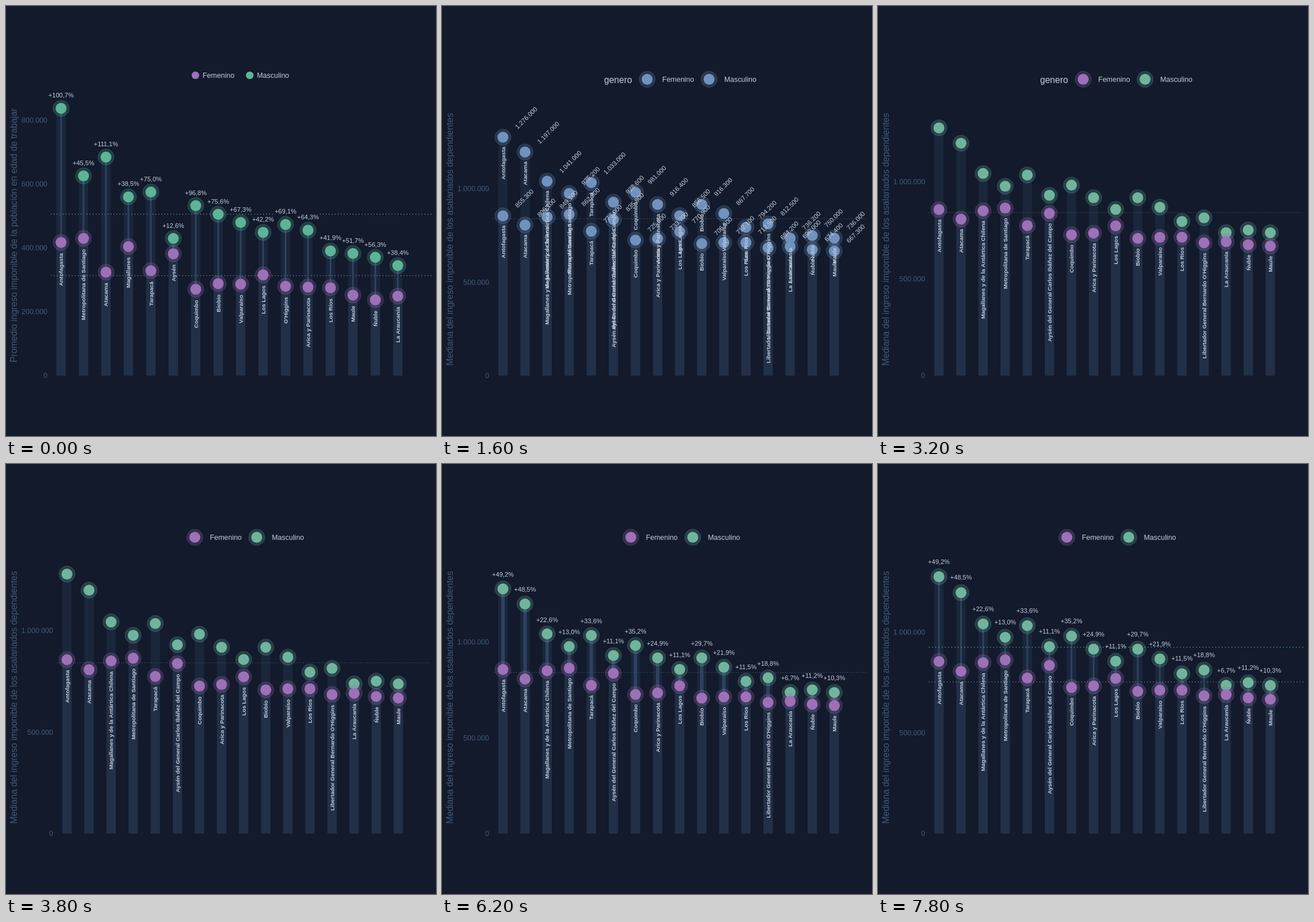
An HTML page with a canvas that plays this animation: 748x748 px, repeating every 8 s.

```html
<!DOCTYPE html>
<html lang="es">
<head>
<meta charset="utf-8">
<style>
html, body { margin: 0; width: 100%; height: 100%; overflow: hidden; background: #121a2b; }
canvas { display: block; width: 748px; height: 748px; }
</style>
</head>
<body>
<canvas id="stage" width="748" height="748"></canvas>
<script>
const ctx = document.getElementById('stage').getContext('2d');
const BG = '#121a2b', TEXT = '#c3cedc', AXIS = '#40597a', SEGMENT = '#2d4260';
const BLUE = '#7092be', PURPLE = '#9d70b8', GREEN = '#6fb59d';
const BASE = 643;

// Values in thousands: [region, men, women].
const average = {
  title: 'Promedio ingreso imponible de la población en edad de trabajar',
  titleY: 399, x0: 95.8, step: 39.05, tickX: 72, lineX: 78, ticks: [0, 200, 400, 600, 800],
  rows: [
    ['Antofagasta', 838, 100.7], ['Metropolitana de Santiago', 626, 45.5], ['Atacama', 685, 111.1],
    ['Magallanes', 560.5, 38.5], ['Tarapacá', 575.5, 75], ['Aysén', 430, 12.6],
    ['Coquimbo', 533, 96.8], ['Biobío', 506, 75.6], ['Valparaíso', 480, 67.3],
    ['Los Lagos', 449, 42.2], ["O'Higgins", 474, 69.1], ['Arica y Parinacota', 456, 64.3],
    ['Los Ríos', 391, 41.9], ['Maule', 383, 51.7], ['Ñuble', 371, 56.3], ['La Araucanía', 345, 38.4]
  ].map(([name, men, gap]) => [name, men, men / (1 + gap / 100)])
};
const median = {
  title: 'Mediana del ingreso imponible de los asalariados dependientes',
  titleY: 406, x0: 106, step: 38.43, tickX: 82, lineX: 88.5, ticks: [0, 500, 1000],
  rows: [
    ['Antofagasta', 1276, 855.3], ['Atacama', 1197, 806.1],
    ['Magallanes y de la Antártica Chilena', 1041, 849.1],
    ['Metropolitana de Santiago', 975.2, 862.9], ['Tarapacá', 1033, 773],
    ['Aysén del General Carlos Ibáñez del Campo', 928.6, 835.8],
    ['Coquimbo', 981, 725.6], ['Arica y Parinacota', 916.4, 733.7], ['Los Lagos', 856.5, 770.9],
    ['Biobío', 916.3, 706.5], ['Valparaíso', 867.7, 712.1], ['Los Ríos', 794.2, 712.5],
    ["Libertador General Bernardo O'Higgins", 812.5, 684.2], ['La Araucanía', 736.2, 690],
    ['Ñuble', 750, 674.4], ['Maule', 736, 667.3]
  ]
};

// Each entry changes some settings of the chart from its start time on.
const timeline = [
  [0, { chart: average, scale: .555, women: PURPLE, men: '#5cb598', legend: 'small', nameGap: 33,
        percent: { nudge: 40.5, plus: true, box: true }, segment: 3,
        lines: [[506, '#7fa8a0', 1.3], [313.5, '#837a9c', 1.3]] }],
  [1000, { chart: median, scale: .3378, women: BLUE, men: BLUE, legend: 'titled', nameGap: 50,
           menNames: true, percent: null, segment: 0, lines: [[839.8, '#5f7896', 1]] }],
  [1400, { scale: .325, amounts: true }],
  [2000, { scale: .3378, amounts: false, women: PURPLE, men: GREEN }],
  [2600, { menNames: false }],
  [3400, { legend: 'plain' }],
  [3600, { scale: .3538 }],
  [4200, { percent: { nudge: 55 } }],
  [4400, { percent: { nudge: 55, left: true } }],
  [4600, { scale: .3402, percent: { nudge: 50, left: true }, nameGap: 75 }],
  [5200, { scale: .3337, percent: { nudge: 75, left: true }, nameGap: 50 }],
  [5400, { percent: { nudge: 75 } }],
  [5600, { percent: { nudge: 75, plus: true } }],
  [5800, { segment: 6, segmentFromZero: true }],
  [6000, { segmentFromZero: false }],
  [6400, { segment: 3 }],
  [6600, { scale: .3503 }],
  [7200, { lines: [[753.6, '#85799a', 1.3]] }],
  [7800, { topLine: [926, '#5cb598', 1.4] }]
];

function stateAt(time) {
  return Object.assign({}, ...timeline.filter(([start]) => start <= time).map(entry => entry[1]));
}

function write(text, x, y, size, { color = TEXT, align = 'left', angle = 0, weight = '' } = {}) {
  ctx.save();
  ctx.translate(x, y);
  ctx.rotate(angle);
  ctx.font = `${weight} ${size}px "Liberation Sans", Arial, sans-serif`;
  ctx.textAlign = align;
  ctx.fillStyle = color;
  ctx.fillText(text, 0, size * .355);
  ctx.restore();
}

function disc(x, y, radius) {
  ctx.beginPath();
  ctx.arc(x, y, radius, 0, 2 * Math.PI);
  ctx.fill();
}

function point(x, y, color) {
  ctx.fillStyle = ctx.strokeStyle = color;
  ctx.globalAlpha = .24;
  disc(x, y, 14.2);
  ctx.lineWidth = .8;
  ctx.stroke();
  ctx.globalAlpha = 1;
  disc(x, y, 9.5);
}

function dottedLine(startX, y, color, width) {
  ctx.strokeStyle = color;
  ctx.lineWidth = width;
  ctx.setLineDash([width, width * 3]);
  ctx.beginPath();
  ctx.moveTo(startX, y);
  ctx.lineTo(740, y);
  ctx.stroke();
  ctx.setLineDash([]);
}

function drawLegend({ legend, women, men }) {
  const small = legend === 'small';
  const shift = legend === 'titled' ? 28.4 : 0;
  const items = small
    ? [['Femenino', women, 329.5, 342], ['Masculino', men, 424, 436.5]]
    : [['Femenino', women, 328.5, 354.7], ['Masculino', men, 436.2, 462.5]];
  if (shift) write('genero', 282, 128, 15.6);
  for (const [label, color, dotX, textX] of items) {
    const y = small ? 120.5 : 127.5;
    ctx.fillStyle = color;
    if (small) disc(dotX, y, 6.6);
    else point(dotX + shift, y, color);
    write(label, textX + shift, y, 12.45);
  }
}

function drawPercent({ nudge, plus, left, box }, x, men, women, toY) {
  const value = ((men / women - 1) * 100).toFixed(1).replace('.', ',');
  const y = toY(men + nudge);
  if (box) {
    ctx.fillStyle = BG;
    ctx.fillRect(x - 20, y - 6.5, 40, 13);
  }
  write((plus ? '+' : '') + value + '%', x, y, 11.05, { align: left ? 'left' : 'center' });
}

function draw(state) {
  const { chart, scale } = state;
  const toY = value => BASE - value * scale;
  const thousands = value => Math.round(value * 1000).toString().replace(/\B(?=(\d{3})+$)/g, '.');
  const eachRow = paint => chart.rows.forEach(([name, men, women], i) =>
    paint(chart.x0 + i * chart.step, men, women, name));
  const drawLine = ([value, color, width]) => dottedLine(chart.lineX, toY(value), color, width);
  const upright = { angle: -Math.PI / 2 };

  ctx.fillStyle = BG;
  ctx.fillRect(0, 0, 748, 748);
  write(chart.title, 13.7, chart.titleY, 15.6, { ...upright, color: AXIS, align: 'center' });
  for (const tick of chart.ticks)
    write(thousands(tick), chart.tickX, toY(tick), 12.45, { color: AXIS, align: 'right' });
  drawLegend(state);

  eachRow((x, men, women) => {
    ctx.fillStyle = 'rgba(75, 108, 140, .15)';
    for (const value of [men, women]) ctx.fillRect(x - 8.2, toY(value), 16.4, value * scale);
  });
  state.lines.forEach(drawLine);
  if (state.segment) eachRow((x, men, women) => {
    const bottom = state.segmentFromZero ? 0 : women;
    ctx.fillStyle = SEGMENT;
    ctx.fillRect(x - state.segment / 2, toY(men), state.segment, (men - bottom) * scale);
  });
  if (state.percent?.box)
    eachRow((x, men, women) => drawPercent(state.percent, x, men, women, toY));
  eachRow((x, men) => point(x, toY(men), state.men));
  eachRow((x, men, women) => point(x, toY(women), state.women));

  eachRow((x, men, women, name) => {
    for (const value of state.menNames ? [men, women] : [women]) {
      const y = toY(value - state.nameGap) + .4;
      write(name, x, y, 9.88, { ...upright, align: 'right', weight: 'bold' });
    }
    if (state.amounts) for (const value of [men, women])
      write(thousands(value), x + 23, toY(value + 50), 11.05, { angle: -Math.PI / 4 });
    if (state.percent && !state.percent.box) drawPercent(state.percent, x, men, women, toY);
  });
  if (state.topLine) drawLine(state.topLine);
}

const startTime = performance.now();
function tick() {
  draw(stateAt((performance.now() - startTime) % 8000));
  requestAnimationFrame(tick);
}
tick();
</script>
</body>
</html>
```
